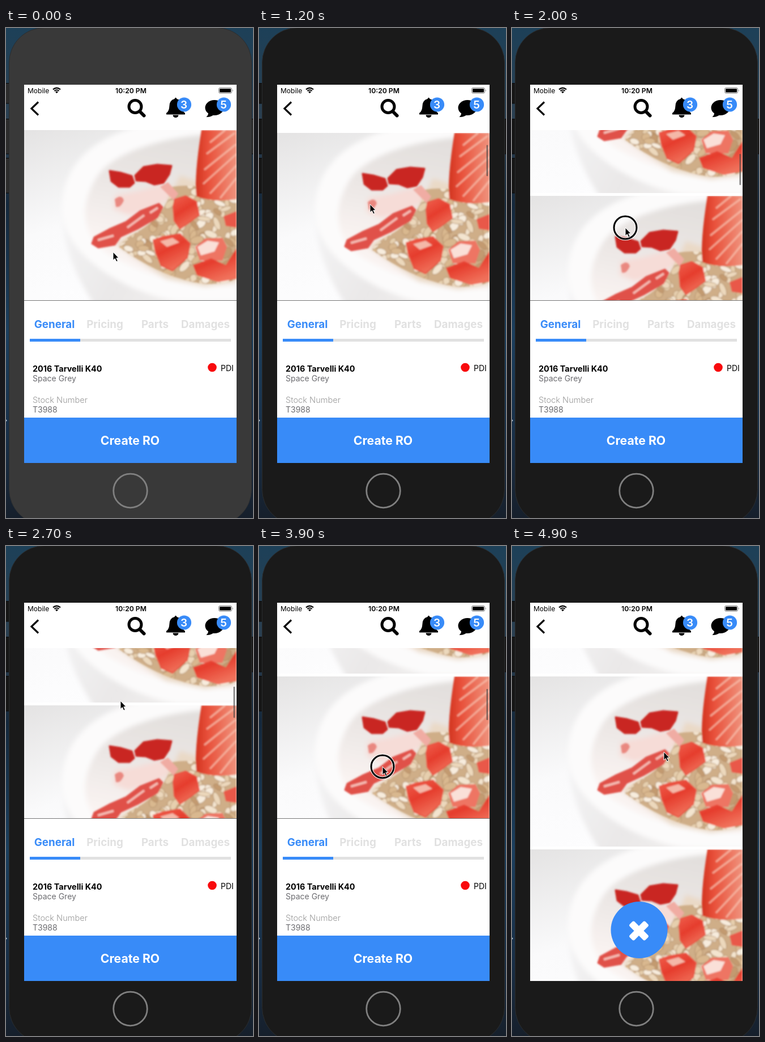
These frames come from a looping animation (436 px wide and 864 px high, 5000 ms). An HTML page:

```html
<!DOCTYPE html>
<html lang="en">
<head>
<meta charset="utf-8">
<title>Vehicle details</title>
<style>
  html, body { margin: 0; width: 100%; height: 100%; overflow: hidden; background: #101b28; }
  svg { display: block; font-family: Inter, Roboto, sans-serif; }
  .tab { font-size: 18.8px; font-weight: 700; fill: #e1e1e1; text-anchor: middle; }
  .badge { font-size: 19px; font-weight: 600; fill: #fff; text-anchor: middle; }
</style>
</head>
<body>
<svg width="436" height="864" viewBox="0 0 436 864">
  <defs>
    <linearGradient id="sky" x2="0" y2="1">
      <stop stop-color="#1d4058"/><stop offset=".2" stop-color="#2b3f50"/>
      <stop offset=".36" stop-color="#14283c"/><stop offset=".62" stop-color="#1b3f5e"/>
      <stop offset=".85" stop-color="#182e46"/><stop offset="1" stop-color="#161f2b"/>
    </linearGradient>
    <linearGradient id="table" x2=".4" y2="1">
      <stop stop-color="#e4e3e3"/><stop offset=".55" stop-color="#fafafb"/><stop offset="1" stop-color="#fdfdfe"/>
    </linearGradient>
    <linearGradient id="side" x2="1" y2=".3">
      <stop stop-color="#f5f5f6"/><stop offset=".5" stop-color="#eae8e8"/><stop offset="1" stop-color="#f4f2f1"/>
    </linearGradient>
    <linearGradient id="milk" x1=".5" x2=".3" y2="1">
      <stop stop-color="#e2dfdd"/><stop offset=".35" stop-color="#ebe6e4"/><stop offset=".7" stop-color="#f9f3f1"/>
    </linearGradient>
    <linearGradient id="half" x2="1">
      <stop stop-color="#d23420"/><stop offset=".3" stop-color="#e8503a"/><stop offset="1" stop-color="#f0937d"/>
    </linearGradient>
    <linearGradient id="fruit" x2=".5" y2="1">
      <stop stop-color="#f0614f"/><stop offset=".5" stop-color="#e53d2d"/><stop offset="1" stop-color="#f0705a"/>
    </linearGradient>
    <filter id="soft"><feGaussianBlur stdDeviation="4"/></filter>
    <filter id="blur"><feGaussianBlur stdDeviation="1.4"/></filter>
    <clipPath id="frame"><path d="M0 0H375V300H0Z"/></clipPath>
    <clipPath id="grain"><path d="M262 100Q310 92 375 118V262Q345 276 300 268Q235 255 168 206Q175 192 200 180Q250 150 262 100Z"/></clipPath>
    <clipPath id="screen"><path d="M32 180H407V767H32Z"/></clipPath>

    <g id="photo" clip-path="url(#frame)">
      <path fill="url(#table)" d="M0 0H375V300H0Z"/>
      <g filter="url(#soft)">
        <path fill="url(#side)" d="M65 140C70 220 100 270 125 310H390V140Z"/>
        <path fill="#fcfbfb" d="M205 -8C120 15 67 60 67 140C67 215 170 285 270 302H390V-8Z"/>
        <path fill="url(#milk)" d="M390 8C300 0 170 25 130 80C88 145 110 200 160 225C220 258 290 280 390 274Z"/>
        <path fill="#f6dcd7" d="M160 115L200 108L250 95L270 110L235 135L185 150L158 140Z"/>
        <path fill="#ead9c6" d="M275 80L375 112V268L320 276L250 262L190 222L160 200L240 150Z"/>
      </g>
      <g filter="url(#blur)" stroke-linejoin="round">
        <g clip-path="url(#grain)">
          <path fill="#cfae88" d="M160 90H375V290H160Z"/>
          <g id="oats" stroke="#a98460" stroke-width=".8"></g>
        </g>
        <path fill="url(#half)" d="M313 0H375V122Q335 128 304 117Q300 80 313 0Z"/>
        <path fill="none" stroke="#f8c4b2" stroke-width="3" opacity=".75"
          d="M372 5L322 42M374 25L318 70M375 42L316 95M375 62L328 112M375 84L346 120M355 0L328 22"/>
        <g fill="#c92620" stroke="#c92620" stroke-width="3">
          <path d="M151 72L170 75L190 81L194 93L186 100L167 100L154 90Z"/>
          <path d="M196 80L211 65L235 61L260 63L256 78L246 93L230 96L215 90L198 89Z"/>
        </g>
        <path fill="#e98880" d="M160 122Q172 112 176 124Q170 138 162 135Z"/>
        <path fill="#f0aca3" d="M240 100L254 92L272 112L264 124Z"/>
        <path fill="#e0514a" stroke="#e0514a" stroke-width="3" d="M120 200L124 189L150 175L180 162L205 143L238 130L244 136L235 154L200 174L170 188L160 202L131 207Z"/>
        <path fill="none" stroke="#f5bdb5" stroke-width="4" d="M130 194L158 186M182 172L212 150M222 146L236 137"/>
        <g fill="url(#fruit)" stroke="#e8503f" stroke-width="2">
          <path d="M266 122L285 116L304 126L309 150L290 164L275 174L265 160L263 135Z"/>
          <path d="M228 194L245 188L275 183L293 200L288 225L262 248L242 239L232 215Z"/>
        </g>
        <path fill="#f4b8a8" d="M240 196L262 190L274 198L252 206Z"/>
        <path fill="#ee7564" d="M302 206L320 191L350 190L358 206L350 230L310 230Z"/>
        <path fill="#fae0d8" d="M306 206L324 195L344 198L336 214L312 221Z"/>
        <path fill="url(#fruit)" d="M298 238L330 226L356 238L375 208V262L342 268L305 256Z"/>
        <path fill="#e9594a" d="M352 152L375 143V172L356 169Z"/>
      </g>
    </g>
  </defs>

  <path fill="url(#sky)" d="M0 0H436V864H0Z"/>
  <circle cx="0" cy="692" r="1.5" fill="#cde"/>
  <path id="keys" stroke="#080808" d="M-3 97.5H7V133H-3ZM-3 160.5H7V222H-3ZM-3 229.5H7V291H-3ZM432 160.5H440V222H432Z"/>
  <rect id="body" x="5.5" y="-.5" width="428" height="876" rx="62" stroke="#2b2d2f"/>
  <circle cx="219.5" cy="816" r="29.8" fill="none" stroke="#808080" stroke-width="2.8"/>
  <path fill="#fff" d="M32 100H407V767H32Z"/>

  <g clip-path="url(#screen)">
    <g id="gallery">
      <use href="#photo" x="32" y="180"/><use href="#photo" x="32" y="485"/><use href="#photo" x="32" y="790"/>
    </g>
    <rect id="bar" x="401.5" y="182" width="2.6" height="55" rx="1.3" fill="#444"/>
    <g id="close">
      <circle cx="224.5" cy="677" r="50" fill="#388bf8"/>
      <g transform="translate(224 678.5) rotate(45)" fill="#fff">
        <rect x="-19.5" y="-6" width="39" height="12" rx="3"/>
        <rect x="-6" y="-19.5" width="12" height="39" rx="3"/>
      </g>
    </g>
    <g id="panel">
      <path fill="#fff" d="M32 480H407V767H32Z"/>
      <path stroke="#777" d="M32 480.5H407"/>
      <text class="tab" x="85.5" y="528.5" style="fill:#388bf8">General</text>
      <text class="tab" x="174.5" y="528.5">Pricing</text>
      <text class="tab" x="263" y="528.5">Parts</text>
      <text class="tab" x="352" y="528.5">Damages</text>
      <path fill="#e1e1e1" d="M42 548H397V553H42Z"/>
      <path fill="#388bf8" d="M42 548H131V553H42Z"/>
      <text x="47" y="605.5" font-size="14.4" font-weight="700">2016 Tarvelli K40</text>
      <text x="47" y="622.5" font-size="14" fill="#6c6c70">Space Grey</text>
      <text x="47" y="660.5" font-size="14.6" font-weight="300" fill="#999">Stock Number</text>
      <text x="47" y="677.5" font-size="14" fill="#6c6c70">T3988</text>
      <circle cx="364" cy="598.5" r="7.8" fill="#f80a0d"/>
      <text x="379" y="604.5" font-size="14">PDI</text>
      <path fill="#388bf8" d="M32 687H407V767H32Z"/>
      <text x="219" y="734.5" font-size="21.2" font-weight="700" fill="#fff" text-anchor="middle">Create RO</text>
    </g>
  </g>

  <text x="38" y="115" font-size="12">Mobile</text>
  <g fill="none" stroke="#000" stroke-width="2.1">
    <path d="M83 108.4Q89.5 102.8 96 108.4M85.4 111Q89.5 107.5 93.6 111"/>
    <path fill="#000" stroke="none" d="M87 112.6Q89.5 110.5 92 112.6L89.5 115.2Z"/>
  </g>
  <text x="220.5" y="115" font-size="12.2" font-weight="600" text-anchor="middle">10:20 PM</text>
  <rect x="375.5" y="105.5" width="23" height="9.5" rx="2.5" fill="none" stroke="#777"/>
  <rect x="377" y="107" width="20" height="6.5" rx="1.3"/>
  <path fill="#777" d="M400 108.500q1.800 1.700 0 3.600Z"/>
  <g fill="none" stroke="#000">
    <path stroke-width="3.2" d="M57 130.5L45 142L57 153.5"/>
    <circle cx="228" cy="138.500" r="11" stroke-width="5"/>
    <path stroke-width="6" stroke-linecap="round" d="M237 148L243.5 154.5"/>
  </g>
  <path d="M297.5 125Q299.5 120.500 301.5 125Q310 127 310.500 137Q311 147 316 150V152.500H283V150Q288 147 288.500 137Q289 127 297.500 125ZM294.500 153.500H304.500A5 4.600 0 0 1 294.500 153.500Z"/>
  <ellipse cx="368" cy="140.500" rx="16.500" ry="13.500"/>
  <path d="M357 147Q358 153 353.500 157Q362 157.500 368 152Z"/>
  <g fill="#388bf8"><circle cx="314.5" cy="135" r="12.6"/><circle cx="384.5" cy="135" r="12.6"/></g>
  <text class="badge" x="314" y="142">3</text>
  <text class="badge" x="384" y="142">5</text>

  <g id="mouse">
    <g id="ring" fill="none">
      <circle r="20" stroke="#fff" stroke-width="5"/><circle r="20" stroke="#000" stroke-width="3"/>
    </g>
    <path stroke="#fff" d="M0 0V14.5L3.3 11.5L5.8 17L8.3 16L5.8 10.6H10Z"/>
  </g>
</svg>
<script>
const $ = id => document.getElementById(id);
const set = (id, name, value) => $(id).setAttribute(name, value);

let seed = 7;
const rnd = (a, b) => {
  seed = seed * 16807 % 2147483647;
  return a + (b - a) * seed / 2147483647;
};
const tones = ['#ecd8bc', '#d9b88f', '#f7ecdd', '#c39a70', '#e6cfae', '#f3e4cf'];
let oats = '';
for (let i = 0; i < 190; i++) {
  const x = rnd(165, 375), y = rnd(95, 275);
  oats += `<ellipse rx="${rnd(6, 13)}" ry="${rnd(4, 7)}" fill="${tones[i % 6]}" transform="translate(${x} ${y}) rotate(${rnd(0, 180)})"/>`;
}
$('oats').innerHTML = oats;

// [ms, value...] tracks, linear between the points
const pointer = [[0, 189, 395], [400, 190, 390], [800, 193, 297], [900, 193, 268], [1300, 197, 325],
  [1600, 199, 369], [1700, 200, 452], [2000, 200, 352], [2200, 202, 276], [2700, 202, 273],
  [3200, 209, 325], [3700, 218, 389], [4000, 218, 389], [4400, 268, 363], [5000, 268, 363]];
const scroll = [[0, 0], [400, 0], [800, 82], [900, 111], [1100, 255], [1300, 345], [1600, 394], [1700, 394],
  [2000, 494], [2200, 575], [2400, 715], [2700, 814], [3000, 852], [3300, 865], [5000, 865]];
const barFade = [[0, 0], [400, 0], [500, 1], [4000, 1], [4300, 0], [5000, 0]];
const presses = [[400, 900], [1700, 2200], [3800, 4100], [4400, 4600]];

function at(track, t) {
  const i = track.findIndex(p => p[0] > t), a = track[i - 1], b = track[i];
  const k = (t - a[0]) / (b[0] - a[0]);
  return a.slice(1).map((v, j) => v + (b[j + 1] - v) * k);
}

function draw(t) {
  const [x, y] = at(pointer, t), [s] = at(scroll, t), [fade] = at(barFade, t);
  const k = Math.min(1, Math.max(0, (t - 4500) / 400)), open = k * k * (3 - 2 * k);
  const active = t >= 400;
  set('body', 'fill', active ? '#1a1a1a' : '#393939');
  set('keys', 'fill', active ? '#151515' : '#2c2c2c');
  set('gallery', 'transform', `translate(0 ${-(s % 305)})`);
  set('bar', 'y', 182 + s * .081);
  set('bar', 'opacity', fade * .65);
  set('panel', 'transform', `translate(0 ${open * 290})`);
  set('close', 'opacity', open);
  set('mouse', 'transform', `translate(${x} ${y})`);
  set('ring', 'opacity', presses.some(([a, b]) => t >= a && t < b) ? 1 : 0);
}

const start = performance.now();
function tick() {
  draw(Math.floor((performance.now() - start) % 5000 / 100) * 100);
  requestAnimationFrame(tick);
}
tick();
</script>
</body>
</html>
```
